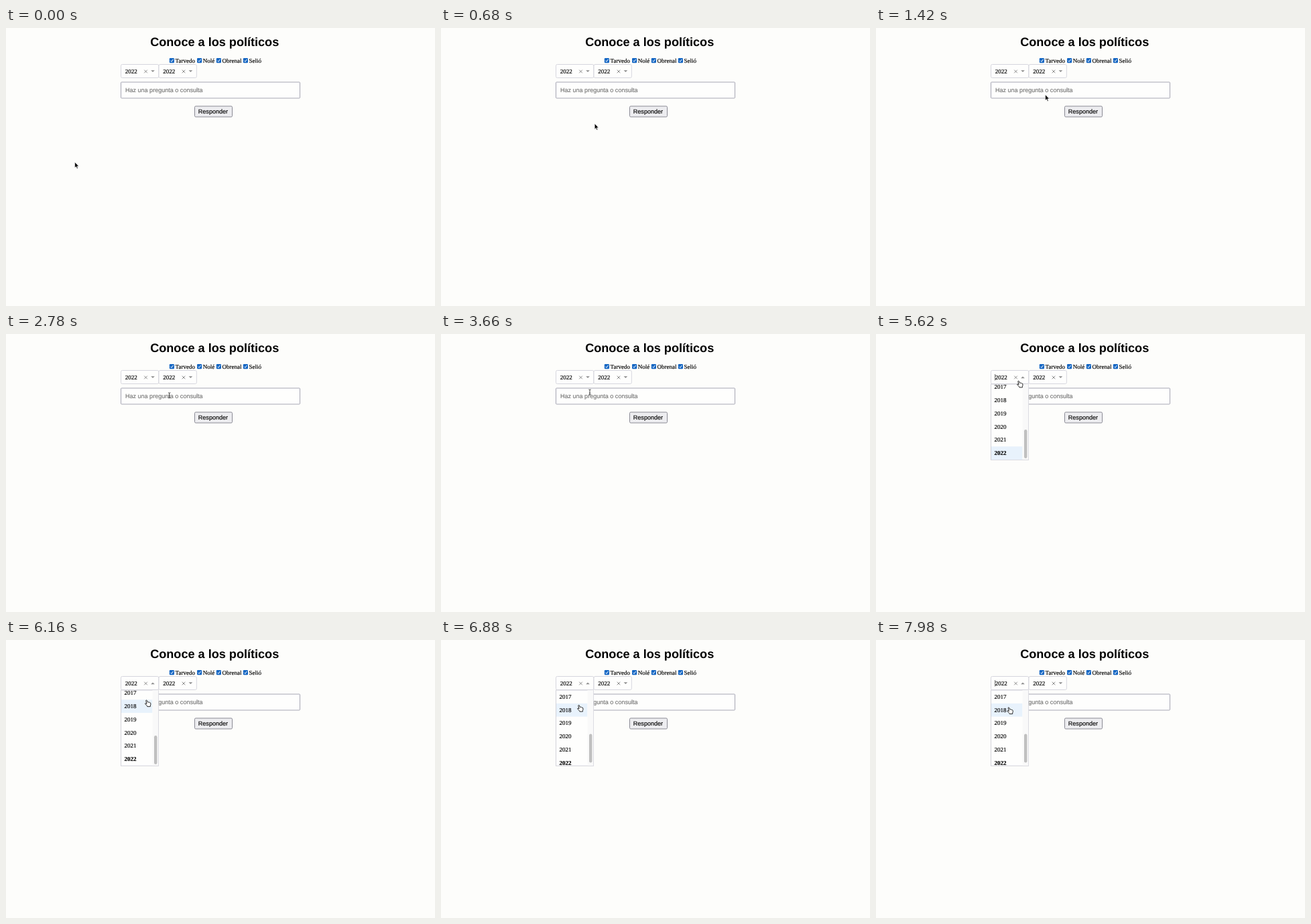
These frames come from a looping animation (640x416 px, 8000 ms). An HTML page:

```html
<!DOCTYPE html>
<html lang="es">
<head>
<meta charset="utf-8">
<title>Conoce a los políticos</title>
<style>
  html, body { margin: 0; width: 100%; height: 100%; overflow: hidden; background: #fdfdfb; }
  svg { display: block; width: 640px; height: 416px; text-rendering: geometricPrecision; }
  text { font: 9.06px "Liberation Serif", Times, serif; fill: #000; stroke: #000; stroke-width: .15px; white-space: pre; }
  .sans { font-family: "Liberation Sans", Arial, sans-serif; }
  .title { font-size: 18.1px; font-weight: bold; stroke: none; }
  .hint { fill: #757575; stroke: #757575; }
  .frame { fill: #fefefd; stroke: #d6d6de; }
</style>
</head>
<body>
<svg id="stage" viewBox="0 0 640 416">
  <rect width="640" height="416" fill="#fdfdfb"/>
  <text class="sans title" x="215.2" y="27">Conoce a los políticos</text>
  <g id="checks"></g>
  <g id="selects"></g>
  <rect x="171.5" y="81" width="267" height="24" rx="1" fill="#fefefd" stroke="#a6a6b4"/>
  <text class="sans hint" x="177.9" y="95.8">Haz una pregunta o consulta</text>
  <rect x="281.5" y="117" width="56" height="16" rx="1.6" fill="#ededf0" stroke="#8a8a94"/>
  <text class="sans" x="286.8" y="128.1">Responder</text>
  <clipPath id="menuClip"><rect x="172" y="75" width="55.5" height="113"/></clipPath>
  <g id="menu">
    <rect x="171.5" y="75" width="56" height="113.3" fill="#fefefd" stroke="#d2d2da"/>
    <g clip-path="url(#menuClip)">
      <rect id="focus" x="172" width="46.5" height="19.75" fill="#e8f2fc"/>
      <g id="rows"></g>
      <rect x="218.5" y="75" width="9" height="113" fill="#f9f9f9"/>
      <rect id="thumb" x="221" width="4.4" height="43" rx="2.2" fill="#c0c0c0"/>
    </g>
  </g>
  <path id="caret" d="M177.7 60V69.5" stroke="#222" stroke-width=".7"/>
  <g id="cursor">
    <path data-kind="arrow" d="M0 0V8.4L1.9 6.7L3.2 9.7L4.6 9.1L3.3 6.2H5.9Z" fill="#000" stroke="#fff" stroke-width=".6"/>
    <path data-kind="beam" d="M-1.7 -4Q0 -4 0 -3V3Q0 4 -1.7 4M1.7 -4Q0 -4 0 -3M0 3Q0 4 1.7 4M-.9 1.3H.9" fill="none" stroke="#222" stroke-width=".8"/>
    <path data-kind="hand" d="M-1.3 .5Q-.7 -.6 .4 .4L1.4 3Q2.3 2.4 2.9 3.2Q3.8 2.7 4.4 3.6Q5.5 3.3 5.8 4.5Q6.4 6.6 5.4 8V9.6H.9V8.8L-2.3 5.7Q-2.6 4.5 -1.2 4.7L.1 5.5Z" fill="#fff" stroke="#111" stroke-width=".9" stroke-linejoin="round"/>
  </g>
</svg>
<script>
const LOOP = 8000, OPEN_AT = 4720, ROW = 19.75, ROWS_TOP = 168.3 - 6 * ROW, SCROLL = 5.6;
const $ = id => document.getElementById(id);

function add(parent, tag, attrs, text = "") {
  const el = document.createElementNS("http://www.w3.org/2000/svg", tag);
  for (const k in attrs) el.setAttribute(k, attrs[k]);
  el.textContent = text;
  parent.append(el);
  return el;
}

[["Tarvedo", 243.8], ["Nolé", 285], ["Obrenal", 313.8], ["Selió", 353.8]].forEach(([name, x]) => {
  const g = $("checks");
  add(g, "rect", { x, y: 45, width: 7.2, height: 7.2, rx: 1.2, fill: "#1768c4" });
  add(g, "path", { d: `M${x + 1.6} 48.8l1.5 1.6l2.6 -3.6`, fill: "none", stroke: "#fff", "stroke-width": 1 });
  add(g, "text", { x: x + 8.7, y: 52 }, name);
});

const arrows = [171.5, 228].map(x => {
  const g = $("selects");
  add(g, "rect", { class: "frame", x, y: 54.5, width: 56.3, height: 20, rx: 2 });
  add(g, "text", { x: x + 6.2, y: 67.6 }, "2022");
  add(g, "path", { d: `M${x + 34.7} 62.7l4.6 4.6m0 -4.6l-4.6 4.6`, stroke: "#808080", "stroke-width": .9 });
  return add(g, "path", { fill: "#8c8c8c" });
});

function pointArrow(i, up) {
  const x = 219 + i * 56.4;
  arrows[i].setAttribute("d", up ? `M${x - 2.8} 66.3h5.6l-2.8 -2.9z` : `M${x - 2.8} 63.2h5.6l-2.8 2.9z`);
}
pointArrow(1, false);

for (let i = 0; i < 7; i++) {
  add($("rows"), "text", {
    x: 176.4, y: ROWS_TOP + i * ROW + 12.8, style: i === 6 ? "font-weight:bold" : ""
  }, 2016 + i);
}

// Pointer path: time, x, y
const path = [
  [0, 102.7, 200.7], [20, 102.7, 200.7], [250, 118, 234], [500, 178, 190], [800, 250, 120],
  [1000, 257, 107], [1420, 252.6, 99.8], [1660, 251, 98], [1840, 245, 92], [2680, 245, 92],
  [3100, 233, 90], [3660, 222, 87], [4000, 221, 80], [4320, 220.5, 69], [4600, 220, 64],
  [5160, 219, 65], [5620, 213, 70.3], [6000, 212, 72], [6300, 208, 104], [6740, 206, 97.5],
  [6880, 206, 97.5], [7680, 204.5, 99], [7980, 198.3, 101], [8000, 198.3, 101]
];
const kinds = [[0, "arrow"], [1660, "beam"], [3960, "arrow"], [4240, "hand"]];

const slope = (i, j, c) => (path[j][c] - path[i][c]) / (path[j][0] - path[i][0]);

// Harmonic mean of neighbouring slopes keeps the path free of overshoot
function tangent(i, c) {
  if (i === 0 || i === path.length - 1) return 0;
  const a = slope(i - 1, i, c), b = slope(i, i + 1, c);
  return a * b > 0 ? 2 * a * b / (a + b) : 0;
}

function along(t, c) {
  let i = 0;
  while (i < path.length - 2 && path[i + 1][0] <= t) i++;
  const d = path[i + 1][0] - path[i][0], u = (t - path[i][0]) / d, v = 1 - u;
  return path[i][c] * v * v * (1 + 2 * u) + path[i + 1][c] * u * u * (3 - 2 * u)
    + d * u * v * (v * tangent(i, c) - u * tangent(i + 1, c));
}

function ease(t, from, to) {
  const u = Math.min(1, Math.max(0, (t - from) / (to - from)));
  return u * u * (3 - 2 * u);
}

const show = (el, on) => el.setAttribute("visibility", on ? "inherit" : "hidden");

function draw(t) {
  const x = along(t, 1), y = along(t, 2), open = t >= OPEN_AT;
  const kind = kinds.filter(k => k[0] <= t).pop()[1];
  $("cursor").setAttribute("transform", `translate(${x} ${y})`);
  for (const el of $("cursor").children) show(el, el.dataset.kind === kind);

  show($("menu"), open);
  show($("caret"), open && (t - OPEN_AT) % 800 < 400);
  pointArrow(0, open);

  const scroll = SCROLL * ease(t, 6380, 6600);
  const row = y > 75.5 ? Math.min(6, Math.floor((y - ROWS_TOP - scroll) / ROW)) : 6;
  $("rows").setAttribute("transform", `translate(0 ${scroll})`);
  $("focus").setAttribute("y", ROWS_TOP + row * ROW + scroll);
  $("thumb").setAttribute("y", 143 - scroll * .45);
}

const start = performance.now();
function tick() {
  draw((performance.now() - start) % LOOP);
  requestAnimationFrame(tick);
}
tick();
</script>
</body>
</html>
```
